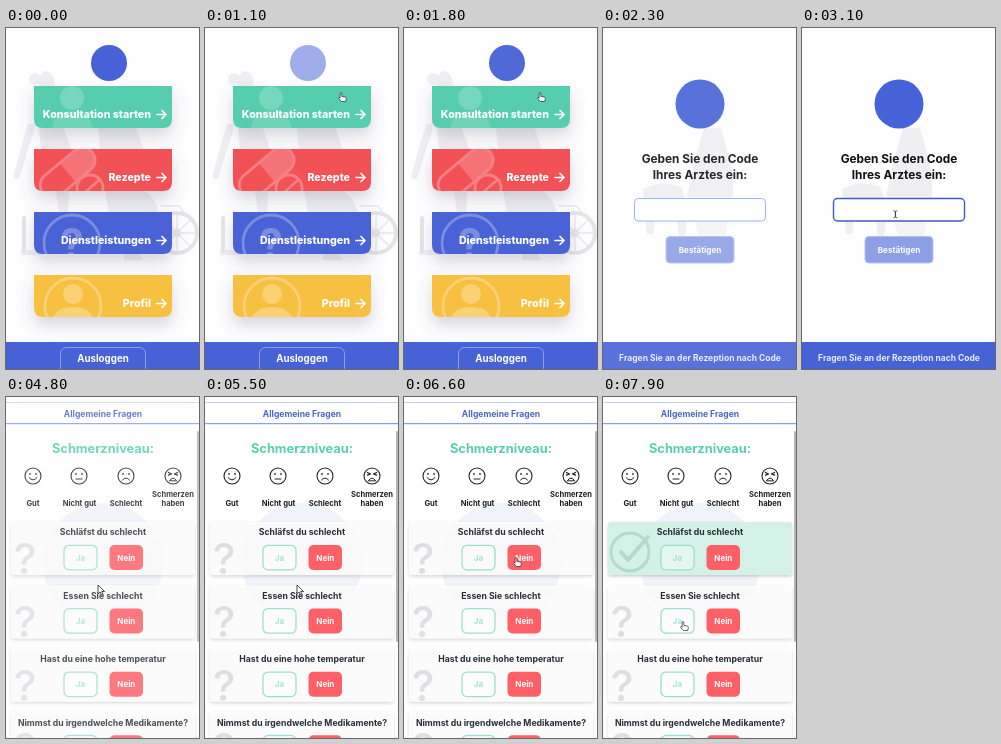
Write an HTML page that moves like this. It is 193 by 341 pixels and loops after 8000 ms.

```html
<!DOCTYPE html>
<html lang="de">
<head>
<meta charset="utf-8">
<style>
html, body { margin: 0; width: 100%; height: 100%; overflow: hidden; background: #fefdff; }
svg { display: block; width: 100%; height: 100%; font-family: Inter, sans-serif; font-weight: 700; }
.page { display: none; }
.mid { text-anchor: middle; }
.end { text-anchor: end; }
.line { fill: none; stroke-linecap: round; stroke-linejoin: round; }
</style>
</head>
<body>
<svg id="stage" viewBox="0 0 193 341"></svg>
<script>
const BLUE = '#4762d7', TEAL = '#58cfb0', RED = '#ff5f66', PAPER = '#fefdff';
const LOOP = 8000;

const rect = (x, y, w, h, r, attrs) =>
  `<rect x="${x}" y="${y}" width="${w}" height="${h}" rx="${r}" ${attrs}/>`;
const circle = (x, y, r, attrs) => `<circle cx="${x}" cy="${y}" r="${r}" ${attrs}/>`;
const line = (d, stroke, width = 1, attrs = '') =>
  `<path class="line" d="${d}" stroke="${stroke}" stroke-width="${width}" ${attrs}/>`;
const text = (str, x, y, size, fill, attrs = 'class="mid"') =>
  `<text x="${x}" y="${y}" font-size="${size}" fill="${fill}" ${attrs}>${str}</text>`;

// ---- Menu page ----
const outline = 'fill="none" stroke="#fff" stroke-width="2.8"';
const icons = [
  circle(66, 70, 12, 'fill="#fff" opacity=".7"') +
    '<path d="M46 104q0-21 20-21q18 0 22 21z" fill="#fff" opacity=".5"/>',
  `<g transform="rotate(-40 62 145)">${rect(30, 132, 64, 25, 12.5, outline)}
    <path d="M62 132h20a12.5 12.5 0 0 1 0 25h-20z" fill="#fff" opacity=".7"/></g>` +
    circle(84, 160, 13, outline) + line('M75 168l18-16', '#fff', 2.5),
  circle(66, 215, 28, outline) + text('?', 66, 231, 42, '#fff'),
  circle(67, 278, 28, outline) +
    circle(67, 266, 10, 'fill="#fff"') + '<path d="M46 294q2-15 21-15t21 15z" fill="#fff"/>'
];

const menuCard = ([label, color], i) => {
  const y = 58 + 63 * i;
  const shape = `M28 ${y}h138v33q0 9-9 9h-120q-9 0-9-9z`;
  return `<clipPath id="card${i}"><path d="${shape}"/></clipPath>
    <path d="${shape}" fill="${color}" filter="url(#glow)"/>
    <g clip-path="url(#card${i})" opacity=".28">${icons[i]}</g>
    ${text(label, 145, y + 32, 10.65, '#fff', 'class="end" font-weight="800"')}
    ${line(`M151 ${y + 28.5}h9m-4-4l4 4l-4 4`, '#fff', 1.7)}`;
};

const menuScenery = `<g fill="#efeef2">
  <circle cx="29" cy="51" r="6"/><path d="M33 58q-1-12 6-15q10 1 10 15z"/>
  <path d="M29 96q-2 14-7 25l-9 30q-6 2-5-5l8-30l6-20z"/>
  <path d="M33 98h24l9 25l-4 62h-9l-8-55l-10-8z"/>
  <circle cx="119" cy="78" r="15"/>
  <path d="M92 98h38l8 25h-44z"/>
  <path d="M99 162h38q12 6 16 24h-50z"/>
  <path d="M118 225h14l6 7h-20zM15 222h18l4 5h-22z"/></g>
  ${circle(171, 205, 20, 'fill="none" stroke="#e4e3e8" stroke-width="4"')}
  ${circle(171, 205, 4, 'fill="#dfdee4"')}
  ${line('M155 178h18l6 8M171 187v36M153 205h36M158 192l26 26M184 192l-26 26', '#e8e7ec', 1.3)}
  ${line('M18 190v33', '#e6e5ea', 4)}`;

const footer = rect(0, 314, 193, 27, 0, `fill="${BLUE}"`);

const menuPage = rect(0, 0, 193, 341, 0, `fill="${PAPER}"`) + menuScenery +
  circle(103, 35, 18, `id="badge" fill="${BLUE}"`) +
  [['Konsultation starten', '#57cdaf'], ['Rezepte', '#f25155'],
   ['Dienstleistungen', '#4862d6'], ['Profil', '#f8c03f']].map(menuCard).join('') +
  footer + rect(54.5, 319.5, 85, 30, 6, 'fill="none" stroke="#8da0f0"') +
  text('Ausloggen', 97, 333.5, 9.75, '#fff');

// ---- Code page ----
const codePage = rect(0, 0, 193, 341, 0, `fill="${PAPER}"`) +
  `<g fill="#efeff1"><path d="M101 100h17l12 44v24h-46l8-36z"/>
   <path d="M40 161q18-10 38-2l8 22l-4 27h-6l-3-22h-20l-3 20h-6z"/>
   <path d="M84 166h46l-8 42h-26z" opacity=".6"/></g>` +
  circle(97, 76, 24.5, `fill="${BLUE}"`) +
  text('Geben Sie den Code', 97, 134.5, 11.85, '#111') +
  text('Ihres Arztes ein:', 97, 151, 11.85, '#111') +
  rect(31.5, 170.5, 131, 22.5, 4, 'id="field" fill="#fff"') +
  text('', 41, 184.8, 7.6, '#222', 'id="code" font-weight="500"') +
  rect(63, 208.5, 68, 26.5, 4, 'fill="#8da0e5" stroke="#b3c1f0"') +
  text('Bestätigen', 97, 224.7, 8.1, '#fff') +
  footer + text('Fragen Sie an der Rezeption nach Code', 97, 333, 8.5, '#e8ecff');

// ---- Question page ----
const face = (x, mouth, eyes) => circle(x, 79, 8, 'fill="none" stroke="#222" stroke-width="1.1"') +
  `<g transform="translate(${x} 79)">${line(eyes || 'M-3-2.6v1M3-2.6v1', '#222', 1.3)}${line(mouth, '#222')}</g>`;

const question = (label, i) => {
  const y = 125 + 63.4 * i;
  const first = i === 0;
  const mark = text('?', 19, y + 52, 43, '#dfdfe1', `class="mid" font-weight="500"${first ? ' id="mark"' : ''}`);
  const check = first ? `<g id="check">${circle(27, 155, 19, 'fill="none" stroke="#b4d9cd" stroke-width="3"')}
    ${line('M18 155l7 8l20-23', '#b4d9cd', 4)}</g>` : '';
  return rect(5, y, 184, 53, 3, `fill="#fff" fill-opacity=".82" filter="url(#shade)"${first ? ' id="firstCard"' : ''}`) +
    mark + check + text(label, 97, y + 13.3, 8.68, '#2a2c36') +
    rect(58, y + 23.3, 33, 24.5, 5, 'fill="#fff" fill-opacity=".35" stroke="#9ee0cd" stroke-width="1.3"') +
    text('Ja', 74.5, y + 38.6, 8, '#a6e3d2') +
    rect(103.5, y + 23, 33.5, 25, 5, `fill="${RED}"`) +
    text('Nein', 120.3, y + 38.6, 8, '#fff');
};

const questionPage = rect(0, 0, 193, 341, 0, 'fill="#fff"') +
  circle(97, 166, 60, 'fill="#f1f3fa"') +
  line('M0 5.5h193', '#c9d1f2', 1) + line('M0 26.7h193', '#7189df', 1) +
  text('Allgemeine Fragen', 97, 19.6, 8.57, '#4c64c8') +
  text('Schmerzniveau:', 97, 56, 12.8, TEAL) +
  face(27, 'M-4 1.5q4 5 8 0') + face(73, 'M-3 3h6') + face(120, 'M-3.5 4q3.5-4 7 0') +
  face(167, 'M-3.5 4.5q3.5-5 7 0z', 'M-4.5-3.5l3 1.5l-3 1.2M4.5-3.5l-3 1.5l3 1.2') +
  [['Gut', 27, 109], ['Nicht gut', 73.5, 109], ['Schlecht', 120, 109], ['Schmerzen', 167, 99.5], ['haben', 167, 109]]
    .map(([label, x, y]) => text(label, x, y, 7.55, '#1d1d20')).join('') +
  ['Schläfst du schlecht', 'Essen Sie schlecht', 'Hast du eine hohe temperatur',
   'Nimmst du irgendwelche Medikamente?'].map(question).join('') +
  rect(191, 34, 2, 211, 1, 'fill="#b5b5b8"');

const pointers = `<g id="pointer">
  <path id="arrow" d="M0 0v9l2.2-2l1.6 3.5l1.4-.7l-1.5-3.3h2.9z" fill="#fff" stroke="#222" stroke-width=".8"/>
  <path id="hand" transform="scale(.85)" d="M-1 0q1-1 2 0v4l4 .8q1.5.5 1.3 2l-.8 3.2h-5l-3.5-4q.5-1.5 2-.2z" fill="#fff" stroke="#222" stroke-width=".8"/>
  <path id="beam" class="line" d="M-1.5-3.5q1.5 0 1.5 1v5q0 1-1.5 1M1.5-3.5q-1.5 0-1.5 1v5q0 1 1.5 1" stroke="#333" stroke-width=".8"/>
</g>`;

const stage = document.getElementById('stage');
stage.innerHTML = `<defs>
  <filter id="glow" x="-25%" y="-30%" width="150%" height="220%"><feDropShadow dx="0" dy="8" stdDeviation="8" flood-color="#555a70" flood-opacity=".24"/></filter>
  <filter id="shade" x="-5%" y="-10%" width="110%" height="130%"><feDropShadow dx="0" dy="1.5" stdDeviation="1.5" flood-color="#555" flood-opacity=".28"/></filter>
  </defs>` +
  [menuPage, codePage, questionPage].map((page, i) => `<g class="page" id="page${i}">${page}</g>`).join('') + pointers;

// ---- Timeline ----
const $ = id => document.getElementById(id);
const set = (id, attrs) => Object.entries(attrs).forEach(([key, value]) => $(id).setAttribute(key, value));
const show = (id, on) => { $(id).style.display = on ? 'inline' : 'none'; };
const progress = (t, start, length) => Math.min(1, Math.max(0, (t - start) / length));
const easeOut = p => 1 - (1 - p) ** 3;
const smooth = p => p * p * (3 - 2 * p);

const CODE_START = 1900, QUESTIONS_START = 4600, ANSWERED = 7000, PULSE = 2000;
const typing = [[3500, 2], [3700, 4], [3800, 6], [4000, 7]];

// time, x, y
const route = [[100, 12, 350], [950, 136, 65], [1850, 136, 65], [2700, 97, 180], [3200, 93, 187],
  [4600, 92, 188], [5500, 92, 188], [6400, 112, 161], [6600, 112, 161], [6900, 76, 161],
  [7250, 76, 161], [7800, 80, 225]];

function pointerAt(t) {
  const next = route.findIndex(stop => stop[0] > t);
  if (next === 0) return route[0].slice(1);
  if (next < 0) return route[route.length - 1].slice(1);
  const [t0, x0, y0] = route[next - 1], [t1, x1, y1] = route[next];
  const p = smooth((t - t0) / (t1 - t0));
  return [x0 + (x1 - x0) * p, y0 + (y1 - y0) * p];
}

function draw(t) {
  show('page0', t < CODE_START);
  show('page1', t >= CODE_START && t < QUESTIONS_START);
  show('page2', t >= QUESTIONS_START);
  $('badge').style.opacity = .75 + .25 * Math.cos(2 * Math.PI * t / PULSE);
  $('page1').style.opacity = easeOut(progress(t, CODE_START, 750));
  $('page2').style.opacity = easeOut(progress(t, QUESTIONS_START, 450));

  const focused = t >= 2900;
  set('field', { stroke: focused ? '#3f5bc5' : '#8caef4', 'stroke-width': focused ? 1.4 : 1 });
  $('code').textContent = '9252220'.slice(0, typing.reduce((n, [time, count]) => t >= time ? count : n, 0));

  const answered = t >= ANSWERED;
  set('firstCard', { fill: answered ? '#d3f1e7' : '#fff', 'fill-opacity': answered ? 1 : .82 });
  show('mark', !answered);
  show('check', answered);

  const [x, y] = pointerAt(t);
  const beam = t >= 2700 && t < QUESTIONS_START;
  const hand = (t >= 900 && t < 2000) || (t >= 6300 && t < 7350) || t >= 7650;
  set('pointer', { transform: `translate(${x} ${y})` });
  show('pointer', t < CODE_START || t >= 2700);
  show('beam', beam);
  show('hand', hand);
  show('arrow', !beam && !hand);
}

const start = performance.now();
function tick() {
  draw((performance.now() - start) % LOOP);
  requestAnimationFrame(tick);
}
tick();
</script>
</body>
</html>
```
